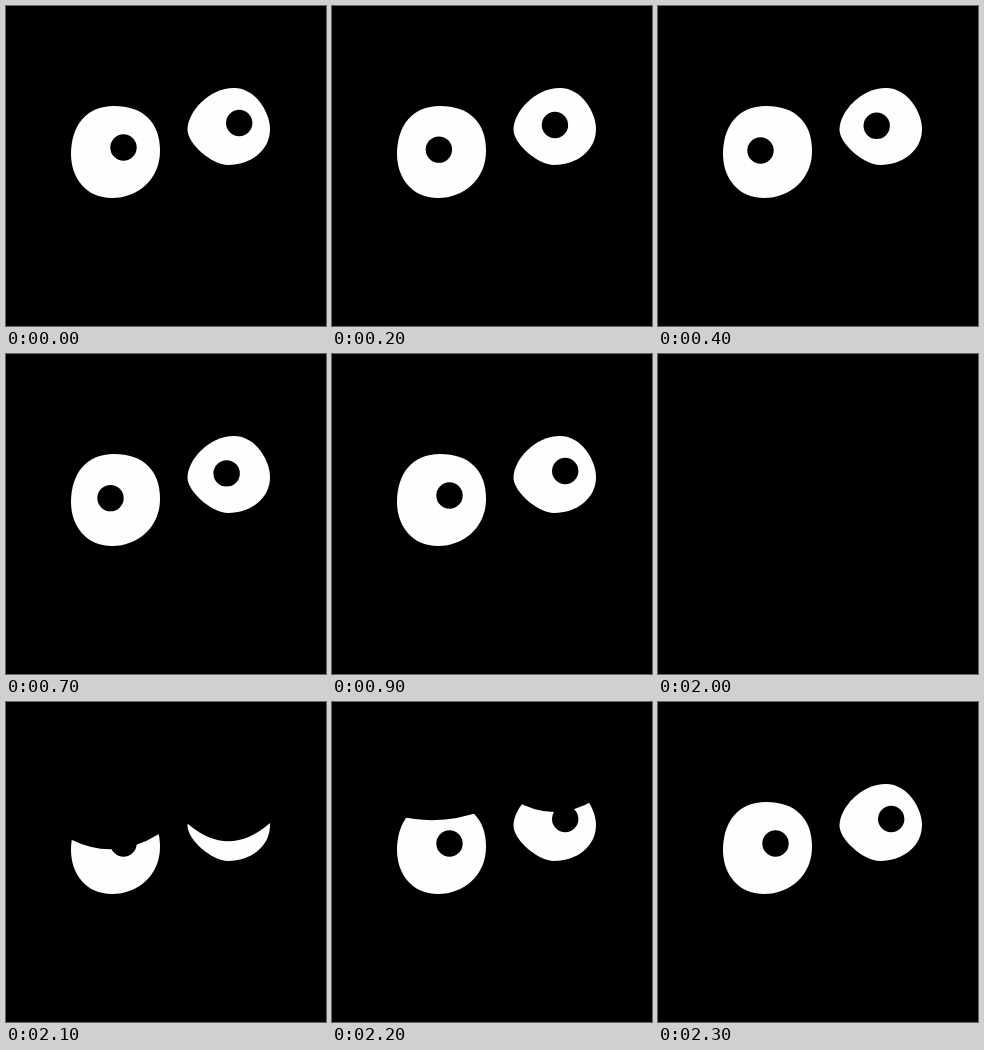
Write an HTML page that moves like this. It is 320 px wide and 320 px high and loops after 3.2 s.

```html
<!DOCTYPE html>
<html lang="en">
<head>
<meta charset="utf-8">
<title>Eyes in the dark</title>
<style>
  html, body { margin: 0; height: 100%; overflow: hidden; background: #000; }
  svg { display: block; width: 100vw; height: 100vh; }
  .white { fill: #fdfffd; }
</style>
</head>
<body>
<svg viewBox="0 0 320 320">
  <g>
    <path class="white" d="M108 100C137 100 154 116 154 145C154 173 132 192 106 192C80 192 65 172 65 148C65 120 80 100 108 100Z"/>
    <circle r="13.2"/>
    <path class="lid"/>
  </g>
  <g>
    <path class="white" d="M228 82C250 82 264 107 264 123C264 145 244 159 222 159C206 159 181.5 138 181.5 123.5C181.5 106 203 82 228 82Z"/>
    <circle r="13.2"/>
    <path class="lid"/>
  </g>
</svg>
<script>
const LOOP = 3200, STEP = 100;

// pupil: rest position and gaze shift; lid: [x, y] of both ends and its sag
const eyes = [
  { pupil: [117.5, 141.5], shift: [-15, 3], lid: [[66, 130], [153, 124]], sag: 20.6 },
  { pupil: [233.2, 117], shift: [-14.5, 2.8], lid: [[182, 114], [264, 113]], sag: 32 }
];
const groups = document.querySelectorAll('g');
const clamp = u => Math.min(1, Math.max(0, u));

// Glance left with an ease-out, return with an ease-in
function gaze(t) {
  return t < 600
    ? Math.sin(clamp(t / 400) * Math.PI / 2)
    : Math.cos(clamp((t - 600) / 300) * Math.PI / 2);
}

// Lid drop relative to the half-closed pose
const blink = { 1900: 0, 2000: 6, 2100: 1, 2200: -2 };
const lidDrop = t => blink[t] ?? -6;

function drawEye(group, { pupil, shift, lid, sag }, look, drop) {
  const circle = group.querySelector('circle');
  circle.setAttribute('cx', pupil[0] + shift[0] * look);
  circle.setAttribute('cy', pupil[1] + shift[1] * look);

  const [[x0, y0], [x1, y1]] = lid;
  const left = y0 + 8 * drop, right = y1 + 8 * drop;
  const bottom = (left + right) / 2 + sag + 3.5 * drop;
  group.querySelector('.lid').setAttribute('d',
    `M${x0 - 9} 0V${left}H${x0}Q${(x0 + x1) / 2} ${bottom} ${x1} ${right}H${x1 + 9}V0Z`);
}

function render(now) {
  const t = Math.floor(now % LOOP / STEP) * STEP;
  eyes.forEach((eye, i) => drawEye(groups[i], eye, gaze(t), lidDrop(t)));
}

const start = performance.now();
function tick() {
  render(performance.now() - start);
  requestAnimationFrame(tick);
}
tick();
</script>
</body>
</html>
```
